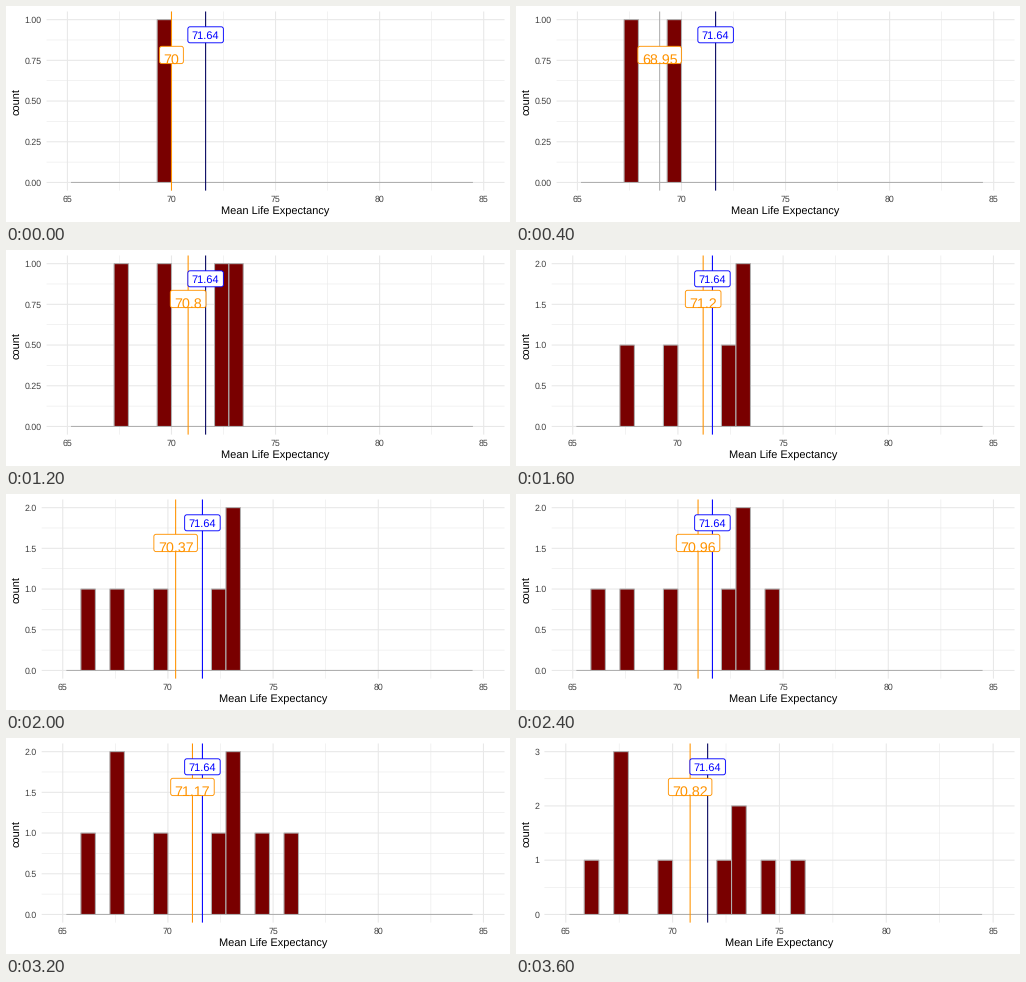
Animation, 504 px wide and 216 px high, one loop 4 s. Source, as a matplotlib script:

```python
import numpy as np
import matplotlib.pyplot as plt
from matplotlib.animation import FuncAnimation
from matplotlib.patches import FancyBboxPatch, Rectangle

plt.rcParams["font.family"] = "Liberation Sans"
plt.rcParams["text.hinting"] = "none"

W, H, DPI = 504, 216, 72
TOP, BOTTOM, RIGHT = 5.5, 184.6, 498.5
BIN = 20 / 29
FIRST_EDGE = 94.5 * BIN
N_BINS = 28
POP_MEAN = 71.64
SAMPLE = [70, 67.9, 73.0, 72.3, 72.8, 66.2, 74.5, 76.0, 67.8, 67.7]

GRID, GREY, RED = "#e8e8e8", "#b0b0b0", "#790000"
ORANGE, BLUE, NAVY = "#ff9300", "#0000ff", "#00005c"

# Tallest bar -> panel left edge, tick step, tick format, population line colour
PANELS = {
    1: (40.6, 0.25, "{:.2f}", NAVY),
    2: (35.7, 0.5, "{:.1f}", BLUE),
    3: (28.4, 1, "{:.0f}", NAVY),
}

fig = plt.figure(figsize=(W / DPI, H / DPI), dpi=DPI, facecolor="white")
ax = fig.add_axes([0, 0, 1, 1])


def line(xs, ys, color, width=1.07, z=1):
    ax.plot(xs, ys, color=color, lw=width, zorder=z, snap=False,
            solid_capstyle="butt")


def text(x, y, s, size, color, ha="center", z=6, **kw):
    ax.text(x, y, s, fontsize=size, color=color, ha=ha, va="baseline",
            zorder=z, **kw)


def label(x, top, bottom, base, s, size, color, z):
    ems = sum(0.278 if c == "." else 0.556 for c in s)
    width = ems * size + 8
    ax.add_patch(FancyBboxPatch(
        (x - width / 2, top), width, bottom - top,
        boxstyle="round,pad=0,rounding_size=2.2", fc="white", ec=color,
        lw=0.9, zorder=z, snap=False))
    text(x, base, s, size, color, z=z + 0.1)


def draw(i):
    ax.clear()
    ax.set(xlim=(0, W), ylim=(H, 0))
    ax.axis("off")

    values = np.array(SAMPLE[:i + 1])
    bins = np.ceil((values - FIRST_EDGE) / BIN - 1e-6).astype(int) - 1
    counts = np.bincount(bins, minlength=N_BINS)
    peak = counts.max()
    left, step, fmt, pop_color = PANELS[peak]

    def px(v):
        return left + (v - 64) * (RIGHT - left) / 22

    def py(v):
        return BOTTOM - (BOTTOM - TOP) * (0.05 + v / peak) / 1.1

    # Grid and axes
    for v in np.arange(65, 85.1, 2.5):
        major = v % 5 == 0
        line([px(v)] * 2, [TOP, BOTTOM], GRID, 1.07 if major else 0.53)
        if major:
            text(px(v), 196.3, f"{v:.0f}", 8.8, "#404040")
    for k in range(int(round(2 * peak / step)) + 1):
        v = k * step / 2
        major = k % 2 == 0
        line([left, RIGHT], [py(v)] * 2, GRID, 1.07 if major else 0.53)
        if major:
            text(left - 4.9, py(v) + 3.2, fmt.format(v), 8.8, "#404040", "right")
    text((left + RIGHT) / 2, 209, "Mean Life Expectancy", 11, "black")
    text(13.8, (TOP + BOTTOM) / 2, "count", 11, "black",
         rotation=90, rotation_mode="anchor")

    # Histogram
    ends = px(FIRST_EDGE), px(FIRST_EDGE + N_BINS * BIN)
    line(ends, [py(0)] * 2, GREY, z=2)
    for k in np.flatnonzero(counts):
        x0, x1 = px(FIRST_EDGE + k * BIN), px(FIRST_EDGE + (k + 1) * BIN)
        ax.add_patch(Rectangle((x0, py(counts[k])), x1 - x0,
                               py(0) - py(counts[k]), fc=RED, ec=GREY,
                               lw=1.07, zorder=3, snap=False))

    # Means
    mean = values.mean()
    line([px(mean)] * 2, [TOP, BOTTOM], GREY if i == 1 else ORANGE, z=4)
    line([px(POP_MEAN)] * 2, [TOP, BOTTOM], pop_color, z=4)
    label(px(mean), 40.3, 57.6, 57.8, f"{mean:.4g}", 14.2, ORANGE, 5)
    label(px(POP_MEAN), 20.8, 36.8, 33, f"{POP_MEAN}", 11, BLUE, 5.5)
    return []


anim = FuncAnimation(fig, draw, frames=len(SAMPLE), interval=400,
                     init_func=lambda: [], repeat=True, repeat_delay=0)
plt.show()
```
